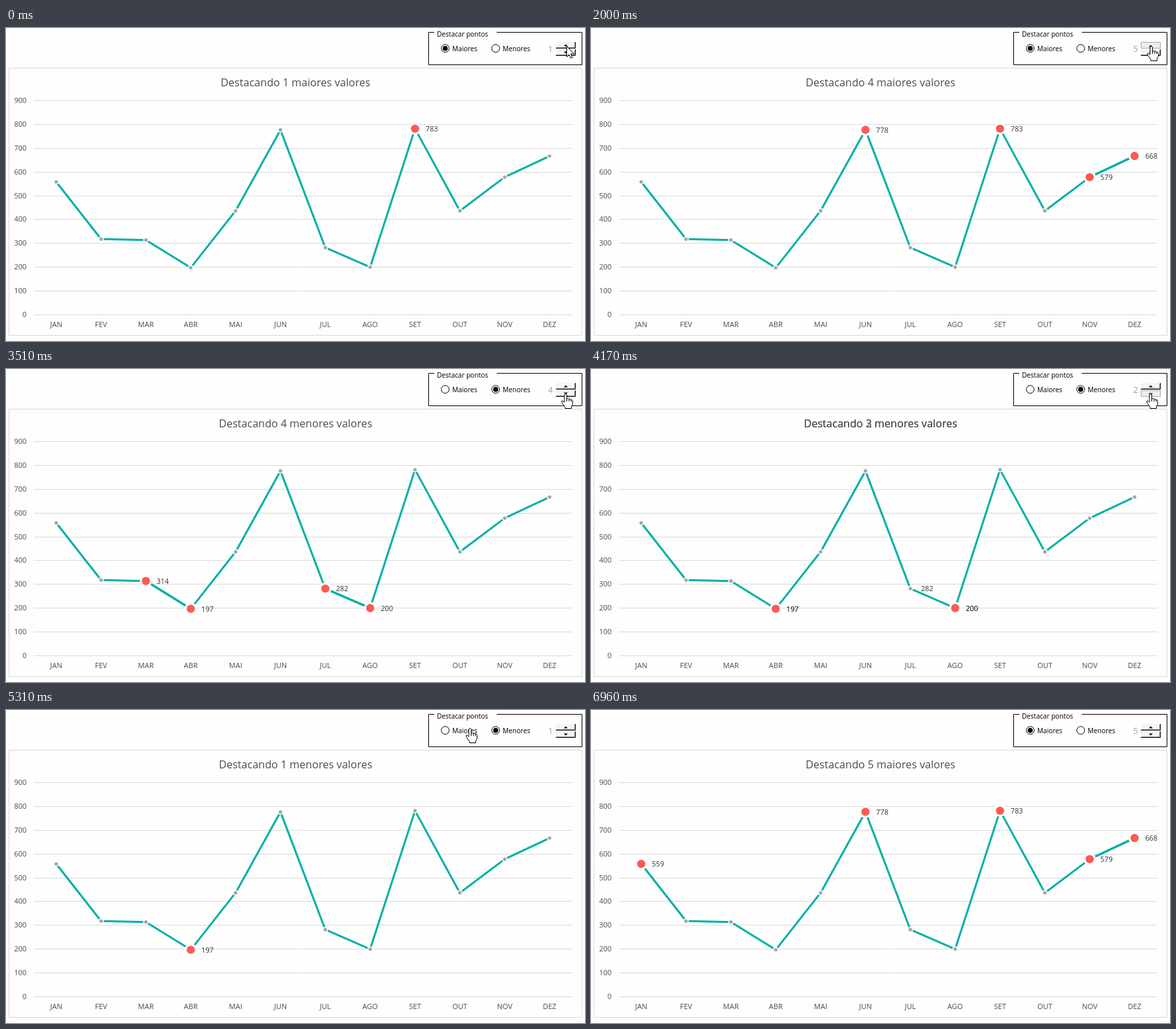
Animation, 872 px wide and 472 px high, one loop 7.24 s. Source, as an HTML page with a canvas:

```html
<!DOCTYPE html>
<html lang="pt">
<head>
<meta charset="utf-8">
<title>Destacar pontos</title>
<style>
html, body { margin: 0; width: 100%; height: 100%; overflow: hidden; background: #fefefe; }
canvas { display: block; }
</style>
</head>
<body>
<canvas width="872" height="472"></canvas>
<script>
const ctx = document.querySelector('canvas').getContext('2d');
const LOOP = 7240, CHART_LAG = 30, PRESS_TIME = 60, LINGER = 215;
const HAND_FROM = 410, POINTER_GONE = 6960;
const FONT = '"Open Sans", "Noto Sans", sans-serif';
const TEAL = '#00b0a5', RED = '#fb5a55', PAPER = '#fefefe', GRID = '#d9d9d9', INK = '#4c4c4c';

const MONTHS = 'JAN FEV MAR ABR MAI JUN JUL AGO SET OUT NOV DEZ'.split(' ');
const VALUES = [559, 318, 314, 197, 437, 778, 282, 200, 783, 437, 579, 668];
const ASCENDING = VALUES.map((_, i) => i).sort((a, b) => VALUES[a] - VALUES[b]);

// Each phase picks a radio button, then presses the spinner four times at a steady pace
const PHASES = [
  { start: 0, mode: 'maiores', firstPress: 755, every: 415 },
  { start: 2660, mode: 'menores', firstPress: 3270, every: 426 },
  { start: 5400, mode: 'maiores', firstPress: 6030, every: 240 }
];

const UP = [844, 27], DOWN = [843, 37], RADIO_MAX = [699, 27], RADIO_MIN = [739, 29], BESIDE = [856, 27];
const MOVES = [
  { start: 2340, end: 2620, from: UP, to: RADIO_MIN },
  { start: 2660, end: 3200, from: RADIO_MIN, to: DOWN },
  { start: 4700, end: 5250, from: DOWN, to: RADIO_MAX, lift: 22 },
  { start: 5400, end: 5680, from: RADIO_MAX, to: BESIDE },
  { start: 5820, end: 5960, from: BESIDE, to: UP }
];

const ARROW = new Path2D('M.5 .5V16.5L4 13L6.5 18.5L9 17.5L6.7 12H11.5Z');
const HAND = new Path2D('M-2 1.8Q-.3 -.8 1.5 1.8V8Q3.5 6.5 5 8.5Q6.7 7.3 8 9.5Q10 8.7 10.5 11.5V15.5L8.5 19.5V22.5H-1V20.5L-5.7 13.8Q-7 10.5 -4.5 11L-2 13.3Z');
const KNUCKLES = new Path2D('M1.5 7V12M5 8.5V12M8 9.5V12');

const xOf = i => 75.6 + i * 67.55;
const yOf = v => 432.1 - v * 0.3579;
const clamp = (v, lo, hi) => Math.min(hi, Math.max(lo, v));

function stateAt(t) {
  const { mode, firstPress, every } = PHASES.findLast(p => p.start <= Math.max(0, t));
  const presses = clamp(Math.floor((t - firstPress) / every) + 1, 0, 4);
  const sincePress = presses ? t - firstPress - (presses - 1) * every : Infinity;
  return { mode, sincePress, count: mode === 'maiores' ? 1 + presses : 5 - presses };
}

const highlighted = ({ mode, count }) =>
  mode === 'maiores' ? ASCENDING.slice(-count) : ASCENDING.slice(0, count);

function text(str, x, y, size, color, align = 'left') {
  ctx.font = `${size}px ${FONT}`;
  ctx.fillStyle = color;
  ctx.textAlign = align;
  ctx.fillText(str, x, y);
}

function line(color, width, ...points) {
  ctx.strokeStyle = color;
  ctx.lineWidth = width;
  ctx.beginPath();
  points.forEach(([x, y]) => ctx.lineTo(x, y));
  ctx.stroke();
}

function disc(x, y, r, fill) {
  ctx.fillStyle = fill;
  ctx.beginPath();
  ctx.arc(x, y, r, 0, 7);
  ctx.fill();
}

function marker([x, y], r, border, color) {
  disc(x, y, r + border, PAPER);
  disc(x, y, r, color);
}

function drawCaptions(state) {
  text(`Destacando ${state.count} ${state.mode} valores`, 436, 88, 16.1, INK, 'center');
  for (const i of highlighted(state)) {
    text(VALUES[i], xOf(i) + 16, yOf(VALUES[i]) + 4, 10.8, '#333');
  }
}

function drawChart(t) {
  ctx.strokeStyle = GRID;
  ctx.lineWidth = 1;
  ctx.strokeRect(4.5, 60.5, 863, 403);
  for (let v = 0; v <= 900; v += 100) {
    const y = Math.floor(yOf(v)) + 0.5;
    line(GRID, 1, [42, y], [853, y]);
    text(v, 31, y + 3.5, 11, INK, 'right');
  }
  MONTHS.forEach((month, i) => text(month, xOf(i), 451, 11, INK, 'center'));

  const state = stateAt(t - CHART_LAG);
  const points = VALUES.map((v, i) => [xOf(i), yOf(v)]);
  const marked = highlighted(state);
  ctx.lineJoin = 'round';
  line(TEAL, 3, ...points);
  points.forEach(p => marker(p, 2.6, 1.5, '#a5a5a5'));
  for (const i of marked) {
    if (marked.includes(i + 1)) line(TEAL, 3.3, points[i], points[i + 1]);
  }
  marked.forEach(i => marker(points[i], 6.2, 3, RED));
  drawCaptions(state);
  // Text of the previous count lingers while counting down
  if (state.mode === 'menores' && state.sincePress < LINGER - CHART_LAG) {
    drawCaptions({ ...state, count: state.count + 1 });
  }
}

function drawRadio(x, label, on) {
  ctx.strokeStyle = '#000';
  ctx.lineWidth = 1;
  ctx.beginPath();
  ctx.arc(x, 30.7, 5.9, 0, 7);
  ctx.stroke();
  if (on) disc(x, 30.7, 3.8, '#000');
  text(label, x + 10.5, 35, 10.1, '#000');
}

function drawButton(y, dir, pressed) {
  ctx.fillStyle = pressed ? '#ececec' : '#f5f3f6';
  ctx.fillRect(828, y, 30, 10);
  if (pressed) {
    ctx.strokeStyle = '#a9a9a9';
    ctx.lineWidth = 1;
    ctx.strokeRect(828.5, y + 0.5, 29, 9);
  } else {
    line('#8c8890', 1, [829, y + 8.5], [856.5, y + 8.5], [856.5, y + 1]);
    line('#111', 1, [828, y + 9.5], [857.5, y + 9.5], [857.5, y]);
  }
  const cy = y + 5 + (pressed ? 1 : 0);
  ctx.fillStyle = '#000';
  ctx.beginPath();
  ctx.moveTo(840, cy + dir * 1.5);
  ctx.lineTo(846, cy + dir * 1.5);
  ctx.lineTo(843, cy - dir * 1.5);
  ctx.fill();
}

function drawPanel(t) {
  const { mode, count, sincePress } = stateAt(t);
  const up = mode === 'maiores', pressed = sincePress < PRESS_TIME;
  line('#000', 1, [645, 6.5], [636.5, 6.5], [636.5, 55.5], [867.5, 55.5], [867.5, 6.5], [739, 6.5]);
  text('Destacar pontos', 649, 13, 10.1, '#000');
  drawRadio(661.5, 'Maiores', up);
  drawRadio(737.5, 'Menores', !up);
  text(count, 816.5, 36, 12.6, '#aa9c9c');
  drawButton(21, 1, pressed && up);
  drawButton(32, -1, pressed && !up);
}

function pointerAt(t) {
  const move = MOVES.findLast(m => m.start <= t);
  if (!move) return UP;
  const { start, end, from, to, lift = 0 } = move;
  const k = clamp((t - start) / (end - start), 0, 1);
  const ease = 1 - (1 - k) ** 3;
  const [x, y] = from.map((v, axis) => v + (to[axis] - v) * ease);
  return [Math.round(x), Math.round(y - lift * Math.sin(Math.PI * ease))];
}

function drawPointer(t) {
  if (t >= POINTER_GONE) return;
  const shape = t < HAND_FROM ? ARROW : HAND;
  ctx.save();
  ctx.translate(...pointerAt(t));
  ctx.fillStyle = '#fff';
  ctx.strokeStyle = '#000';
  ctx.lineWidth = 1;
  ctx.fill(shape);
  ctx.stroke(shape);
  if (shape === HAND) ctx.stroke(KNUCKLES);
  ctx.restore();
}

function frame() {
  const t = performance.now() % LOOP;
  ctx.fillStyle = PAPER;
  ctx.fillRect(0, 0, 872, 472);
  drawChart(t);
  drawPanel(t);
  drawPointer(t);
  requestAnimationFrame(frame);
}
frame();
</script>
</body>
</html>
```
